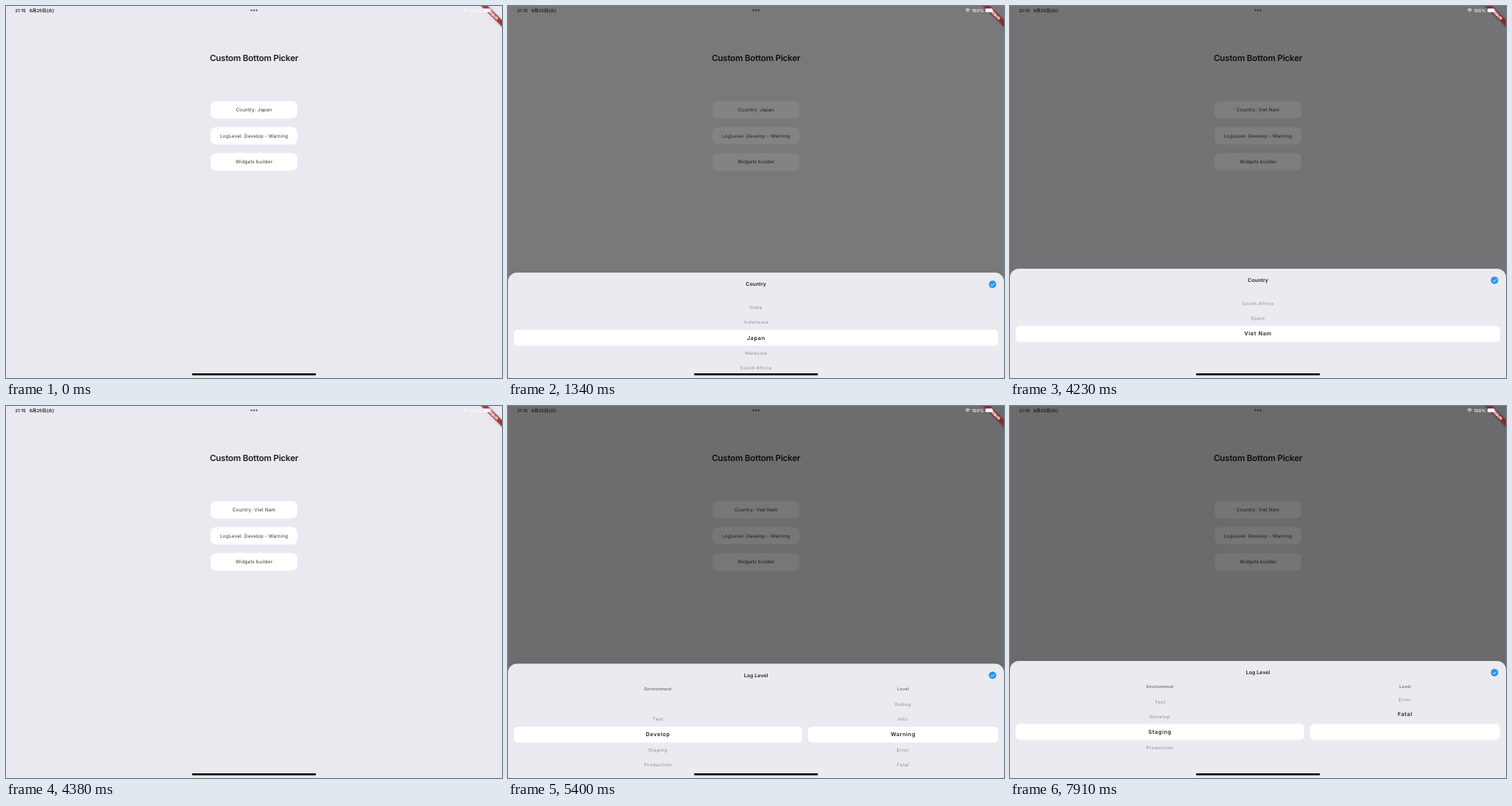
An HTML page that plays this animation: 640 px wide and 480 px high, repeating every 7.99 s.

```html
<!DOCTYPE html>
<html lang="en">
<head>
<meta charset="utf-8">
<title>Custom Bottom Picker</title>
<style>
html, body { margin: 0; width: 100%; height: 100%; overflow: hidden; background: #eae9ef; }
svg { display: block; width: 100vw; height: 100vh; }
text { font-family: Inter, "Noto Sans CJK JP", "Noto Sans CJK", sans-serif; text-anchor: middle; text-rendering: geometricPrecision; fill: #1c1c1e; }
.heading { font-size: 11px; font-weight: 600; letter-spacing: -.2px; }
.label { font-size: 6.2px; letter-spacing: .12px; fill: #3a3a3c; }
.title { font-size: 6.5px; font-weight: 600; letter-spacing: .12px; }
.column { font-size: 5.6px; font-weight: 600; letter-spacing: .1px; fill: #77777b; }
.item { font-size: 5.9px; font-weight: 500; letter-spacing: .48px; fill: #98989e; }
.item.on { font-size: 7px; font-weight: 600; letter-spacing: .55px; fill: #222224; }
.status { font-size: 5.7px; font-weight: 600; text-anchor: start; }
.status.light { font-weight: 500; fill: #fff; }
.debug { font-size: 4.8px; font-weight: 900; fill: #fff; }
</style>
</head>
<body>
<svg id="stage" viewBox="0 0 640 480">
  <defs>
    <clipPath id="wheel"><rect x="0" y="-49" width="640" height="98"/></clipPath>
    <clipPath id="button"><rect x="264" y="156.2" width="112" height="22.5" rx="7"/></clipPath>
    <filter id="blur" x="-20%" y="-100%" width="140%" height="300%"><feGaussianBlur stdDeviation="1.2"/></filter>
  </defs>
  <rect width="640" height="480" fill="#eae9ef"/>
  <text class="heading" x="320" y="67" dy=".36em">Custom Bottom Picker</text>
  <g id="buttons"></g>
  <circle id="splash" cx="381" cy="167.5" r="71" fill="#000" opacity=".07" clip-path="url(#button)"/>
  <rect id="scrim" width="640" height="480"/>
  <g id="sheets"></g>

  <g transform="translate(640 0) rotate(45)">
    <rect x="-30" y="13.1" width="60" height="5.7" opacity=".5" filter="url(#blur)"/>
    <rect x="-30" y="13.1" width="60" height="5.7" fill="#b71c1c" fill-opacity=".68"/>
    <text class="debug" x="0" y="16" dy=".36em">DEBUG</text>
  </g>
  <text class="status" x="11.8" y="5.6" dy=".36em">21:15</text>
  <text class="status" x="30.2" y="5.6" dy=".36em">6月25日(火)</text>
  <g opacity=".52">
    <circle cx="316.6" cy="5.6" r="1.25"/><circle cx="320" cy="5.6" r="1.25"/><circle cx="323.4" cy="5.6" r="1.25"/>
  </g>
  <g fill="none" stroke="#fff" stroke-width="1">
    <path d="M590.3 4.9Q593.1 2.3 595.9 4.9M591.5 6.3Q593.1 4.8 594.7 6.3"/>
    <circle cx="593.1" cy="7.4" r=".5" fill="#fff" stroke="none"/>
  </g>
  <text class="status light" x="598.5" y="5.6" dy=".36em">100%</text>
  <rect x="616.2" y="3.3" width="9" height="4.6" rx="1.4" fill="#fff"/>
  <rect x="625.6" y="4.8" width=".7" height="1.6" rx=".3" fill="#fff"/>
  <rect x="240" y="473.9" width="160" height="2.5" rx="1.25" fill="#080808"/>
</svg>
<script>
const LOOP = 7990, SHEET = 151, REST = 480 - SHEET, ROW = 20.2, RADIUS = 88;
const $ = id => document.getElementById(id);

function add(parent, tag, attrs, text) {
  const el = document.createElementNS("http://www.w3.org/2000/svg", tag);
  for (const key in attrs) el.setAttribute(key, attrs[key]);
  if (text) el.textContent = text;
  parent.append(el);
  return el;
}
const label = (parent, cls, x, y, text) => add(parent, "text", { class: cls, x, y, dy: ".36em" }, text);

const labels = ["Country: Japan", "LogLevel: Develop - Warning", "Widgets builder"].map((text, i) => {
  const y = 134 + i * 33.5;
  add($("buttons"), "rect", { x: 264, y: y - 11.25, width: 112, height: 22.5, rx: 7, fill: "#fff" });
  return label($("buttons"), "label", 320, y, text);
});

function makeSheet(title, center, columns) {
  const group = add($("sheets"), "g", {});
  add(group, "rect", { width: 640, height: 180, rx: 11.5, fill: "#ebeaf0" });
  label(group, "title", 320, 15, title);
  add(group, "circle", { cx: 625.2, cy: 15, r: 4.8, fill: "#2196f3" });
  add(group, "path", { d: "M622.8 15.2L624.5 16.9L627.7 13.5", fill: "none", stroke: "#fff", "stroke-width": 1 });
  const wheels = columns.map(({ x, width, name, items }) => {
    const mid = x + width / 2;
    add(group, "rect", { x, y: center - 10.25, width, height: 20.5, rx: 5, fill: "#fff" });
    if (name) label(group, "column", mid, 33, name);
    const wheel = add(group, "g", { transform: `translate(0 ${center})`, "clip-path": "url(#wheel)" });
    return items.map(text => label(wheel, "item", mid, 0, text));
  });
  return { group, wheels };
}

const country = makeSheet("Country", 84, [
  { x: 7.5, width: 625, items: ["India", "Indonesia", "Japan", "Malaysia", "South Africa", "Spain", "Viet Nam"] }
]);
const log = makeSheet("Log Level", 91.5, [
  { x: 7.5, width: 372, name: "Environment", items: ["Test", "Develop", "Staging", "Production"] },
  { x: 387, width: 245.5, name: "Level", items: ["Debug", "Info", "Warning", "Error", "Fatal"] }
]);

// Number of the step reached: 0 before `from`, `count` from `to` on.
function step(t, from, to, count) {
  if (t < from) return 0;
  return Math.min(count, Math.floor((t - from) * (count - 1) / (to - from) + 1e-6) + 1);
}
const easeInOut = x => x * x * (3 - 2 * x);
const easeOut = x => 1 - (1 - x) ** 2.5;
const approach = (k, rate, power) => 1 - Math.exp(-rate * k ** power);

// Opening amount of a sheet and of its scrim.
function opening(t, from, to, count, settle) {
  const n = step(t, from, to, count);
  const k = n === 0 ? 0 : t >= settle ? 9 : Math.max(.3, n + 4 - count);
  return { sheet: approach(k, .348, 1.72), scrim: approach(k, .17, 2.37) };
}

function countryOpening(t) {
  if (t < 4230) return opening(t, 1120, 1410, 5, 1580);
  const left = [.934, .45, 0][step(t, 4230, 4380, 3) - 1];
  return { sheet: left, scrim: left };
}

function countryPos(t) {
  if (t < 2980) return 2 + 5.1 * easeInOut(Math.max(0, step(t, 2410, 2720, 5) - 1) / 4);
  return 7.1 - 1.1 * easeOut(step(t, 2980, 3410, 7) / 7);
}

function environmentPos(t) {
  if (t < 6630) return [1, 2.1, 2.2][step(t, 6380, 6460, 2)];
  return 2.2 - .2 * easeOut(step(t, 6630, 7010, 6) / 6);
}

function levelPos(t) {
  return t < 7910 ? 2 + 3.03 * easeInOut(step(t, 7550, 7760, 4) / 4) : 5.15;
}

function turn(items, pos) {
  const chosen = Math.min(items.length - 1, Math.round(pos));
  items.forEach((el, i) => {
    const angle = (i - pos) * ROW / RADIUS;
    el.setAttribute("y", RADIUS * Math.sin(angle));
    el.setAttribute("class", i === chosen ? "item on" : "item");
    el.style.display = Math.abs(angle) < .75 ? "" : "none";
  });
}

function place(sheet, amount) {
  sheet.group.style.display = amount > 0 ? "" : "none";
  sheet.group.setAttribute("transform", `translate(0 ${480 - (480 - REST) * amount})`);
}

function draw(t) {
  const first = countryOpening(t), second = opening(t, 5190, 5400, 4, 5580);
  place(country, first.sheet);
  place(log, second.sheet);
  $("scrim").setAttribute("opacity", .54 * Math.max(first.scrim, second.scrim));
  $("splash").style.display = t >= 5190 && t < 5330 ? "" : "none";
  labels[0].textContent = t < 4230 ? "Country: Japan" : "Country: Viet Nam";
  turn(country.wheels[0], countryPos(t));
  turn(log.wheels[0], environmentPos(t));
  turn(log.wheels[1], levelPos(t));
}

const start = performance.now();
function tick() {
  draw((performance.now() - start) % LOOP);
  requestAnimationFrame(tick);
}
tick();
</script>
</body>
</html>
```
